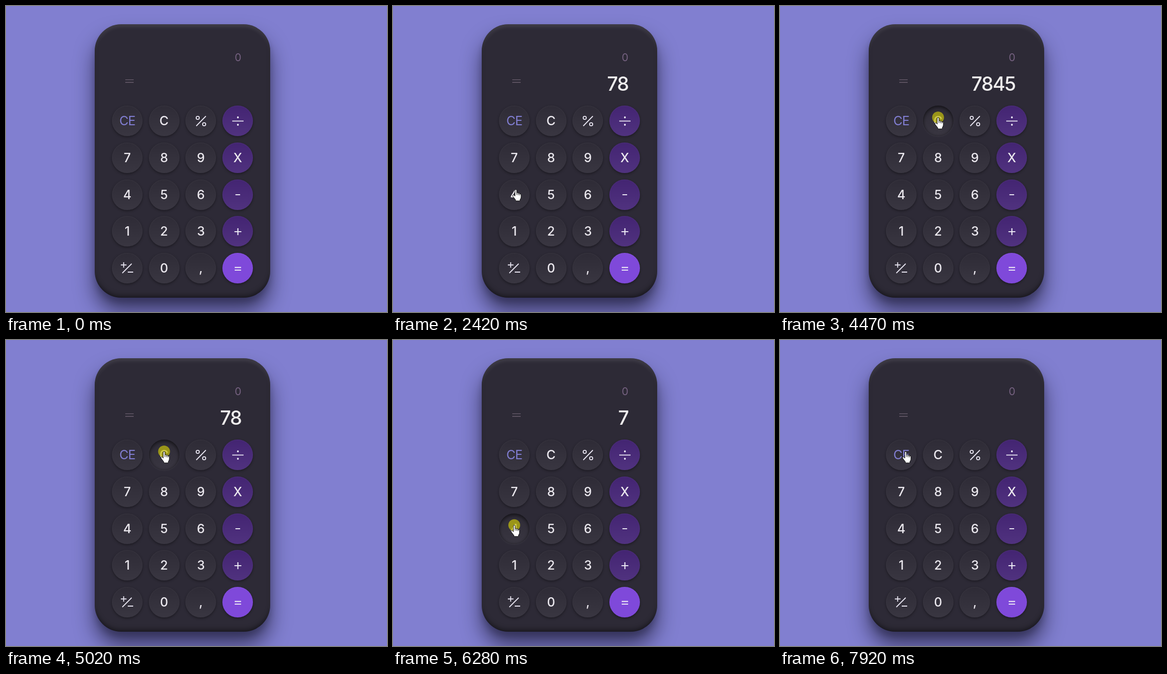
An HTML page for the animation above (7.99 s loop, 773 by 621 pixels).

```html
<!DOCTYPE html>
<html lang="en">
<head>
<meta charset="utf-8">
<title>Calculator</title>
<style>
html, body { margin: 0; width: 100%; height: 100%; overflow: hidden; background: #817fd0; }
body { position: relative; font-family: Inter, Roboto, sans-serif; }
#case {
  position: absolute; left: 180px; top: 37px; width: 356px; height: 555px; border-radius: 54px;
  background: #2d2a36;
  box-shadow: 0 28px 40px rgba(20, 18, 40, .64), 0 10px 12px rgba(20, 18, 40, .2),
    inset 0 6px 9px -2px rgba(255, 255, 255, .13), inset 0 -7px 10px -2px rgba(0, 0, 0, .36),
    inset 0 0 5px rgba(0, 0, 0, .2);
}
.key {
  position: absolute; width: 62px; height: 62px; border-radius: 50%;
  font-size: 25.5px; font-weight: 500; line-height: 62px; text-align: center; color: #ebe8ee;
  background: linear-gradient(#2e2b36, #393641);
  box-shadow: 0 2px 5px rgba(0, 0, 0, .4), inset 0 1px 3px rgba(255, 255, 255, .05);
}
.op { background: linear-gradient(#432472, #50327f); }
.equal { background: #7f49da; }
.clear { color: #817ed2; font-weight: 400; letter-spacing: -.04em; }
.down {
  box-shadow: inset 0 4px 7px rgba(0, 0, 0, .45), inset 0 0 4px rgba(0, 0, 0, .3),
    0 1px 3px rgba(255, 255, 255, .07);
}
#screen { position: absolute; left: 0; top: 0; width: 477.5px; height: 200px; }
#last, #now { position: absolute; right: 0; line-height: 1; }
#last { top: 93.7px; font-size: 21.5px; color: #756180; }
#now { top: 137.5px; font-size: 39px; font-weight: 500; letter-spacing: -.04em; color: #f0eeee; }
svg { position: absolute; left: 0; top: 0; }
</style>
</head>
<body>
<div id="case"></div>
<div id="screen"><div id="last">0</div><div id="now"></div></div>
<div id="keys"></div>
<svg width="773" height="621" fill="none" stroke="#ebe8f4" stroke-width="2">
  <path d="M242 149.7h17M242 155h17" stroke="#6c6070" stroke-width="1.3"/>
  <g stroke-width="1.8">
    <path d="M386 243.5L405.5 223.5"/>
    <circle cx="389" cy="227" r="3.2"/><circle cx="402" cy="240" r="3.2"/>
    <path d="M459 233.5h23"/>
    <path d="M236 542L255 523M233 525.5h11.5M238.7 520v11M247 540h11"/>
  </g>
  <g fill="#ebe8f4" stroke="none"><circle cx="470.5" cy="226" r="1.9"/><circle cx="470.5" cy="241" r="1.9"/></g>
  <path d="M465.5 383h9.5M463.5 458h14M470.5 451v14M464 530.7h13M464 536h13" stroke-width="2.2"/>
  <g id="pointer" stroke="#111" stroke-width="1" stroke-linejoin="round">
    <circle id="dot" r="12" fill="#c3be0d" fill-opacity=".72" stroke="none"/>
    <path id="arrow" fill="#fff" d="M0 0V16.5L4 13L6.8 19L9.4 18L6.7 12H12Z"/>
    <g id="hand">
      <path fill="#fff" d="M-1.7 13V1.7a1.7 1.7 0 0 1 3.4 0V7Q3.3 5.8 4.7 7V8Q6.2 6.8 7.6 8V9Q9.8 8.3 10.6 10.5V15Q10.6 18 8.5 20.5V23H-.5V21L-6 13.8Q-7.2 11 -5 10.8Q-3.5 11 -1.7 13.5Z"/>
      <path d="M1.8 7v4M4.8 8v3.5M7.7 9v3"/>
    </g>
  </g>
</svg>
<script>
const LOOP = 7990, HOLD = 130;
const $ = id => document.getElementById(id);

// Blank labels are drawn as line icons.
const labels = ['CE', 'C', '', '', 7, 8, 9, 'X', 4, 5, 6, '', 1, 2, 3, '', '', 0, ',', ''];
const keys = labels.map((label, i) => {
  const el = document.createElement('div');
  const left = 215 + (i % 4) * 74.7, top = 202.3 + Math.floor(i / 4) * 74.7;
  el.className = 'key' + (i === 19 ? ' equal' : i % 4 === 3 ? ' op' : i ? '' : ' clear');
  el.style.left = left + 'px';
  el.style.top = top + 'px';
  el.textContent = label;
  $('keys').append(el);
  return { el, label: String(label), x: left + 31, y: top + 31 };
});

// Where the pointer rests on a key, from the key's centre.
const aims = { 7: [-10, -15], 5: [6, 9], CE: [9, -7] };

// Each move bends towards an optional control point, then clicks its key.
const moves = [
  { key: '7', leave: 500, arrive: 1190, press: 1330, bend: [-20, 50] },
  { key: '8', leave: 1470, arrive: 1950, press: 2090 },
  { key: '4', leave: 2220, arrive: 2450, press: 2480 },
  { key: '5', leave: 2610, arrive: 2830, press: 2980 },
  { key: 'C', leave: 3440, arrive: 4270, press: 4400, bend: [212, 520], times: 4 },
  { key: '7', leave: 5420, arrive: 5900, press: 5930, bend: [197, 453] },
  { key: '4', leave: 6060, arrive: 6180, press: 6200 },
  { key: '5', leave: 6340, arrive: 6500, press: 6530 },
  { key: '1', leave: 6810, arrive: 7120, press: 7150 },
  { key: 'CE', leave: 7290, arrive: 7570, press: 7640 }
];

let at = [727, 451];
const clicks = [];
for (const m of moves) {
  const { x, y } = keys.find(k => k.label === m.key);
  const [dx, dy] = aims[m.key] || [0, -7];
  m.from = at;
  m.to = at = [x + dx, y + dy];
  m.bend = m.bend || m.from.map((v, i) => (v + m.to[i]) / 2);
  for (let n = 0; n < (m.times || 1); n++) clicks.push({ time: m.press + n * 280, key: m.key });
}

function pointerAt(t) {
  const m = moves.filter(m => m.leave <= t).pop() || moves[0];
  const s = Math.min(1, Math.max(0, (t - m.leave) / (m.arrive - m.leave)));
  const u = s * s * (3 - 2 * s), v = 1 - u;
  return m.from.map((p, i) => v * v * p + 2 * u * v * m.bend[i] + u * u * m.to[i]);
}

function typed(t) {
  return clicks.filter(c => c.time + HOLD <= t).reduce((text, { key }) =>
    key === 'CE' ? '' : key === 'C' ? text.slice(0, -1) : text + key, '');
}

const show = (id, on) => $(id).setAttribute('visibility', on ? 'visible' : 'hidden');

function draw() {
  const t = performance.now() % LOOP;
  const [x, y] = pointerAt(t);
  const press = clicks.find(c => t >= c.time && t < c.time + HOLD);
  const over = keys.some(k => Math.hypot(x - k.x, y - k.y) < 31);
  const visible = t >= moves[0].leave;

  $('now').textContent = typed(t);
  keys.forEach(k => k.el.classList.toggle('down', !!press && press.key === k.label));
  $('pointer').setAttribute('transform', `translate(${x} ${y})`);
  show('arrow', visible && !over);
  show('hand', visible && over);
  show('dot', press);
  requestAnimationFrame(draw);
}
draw();
</script>
</body>
</html>
```
